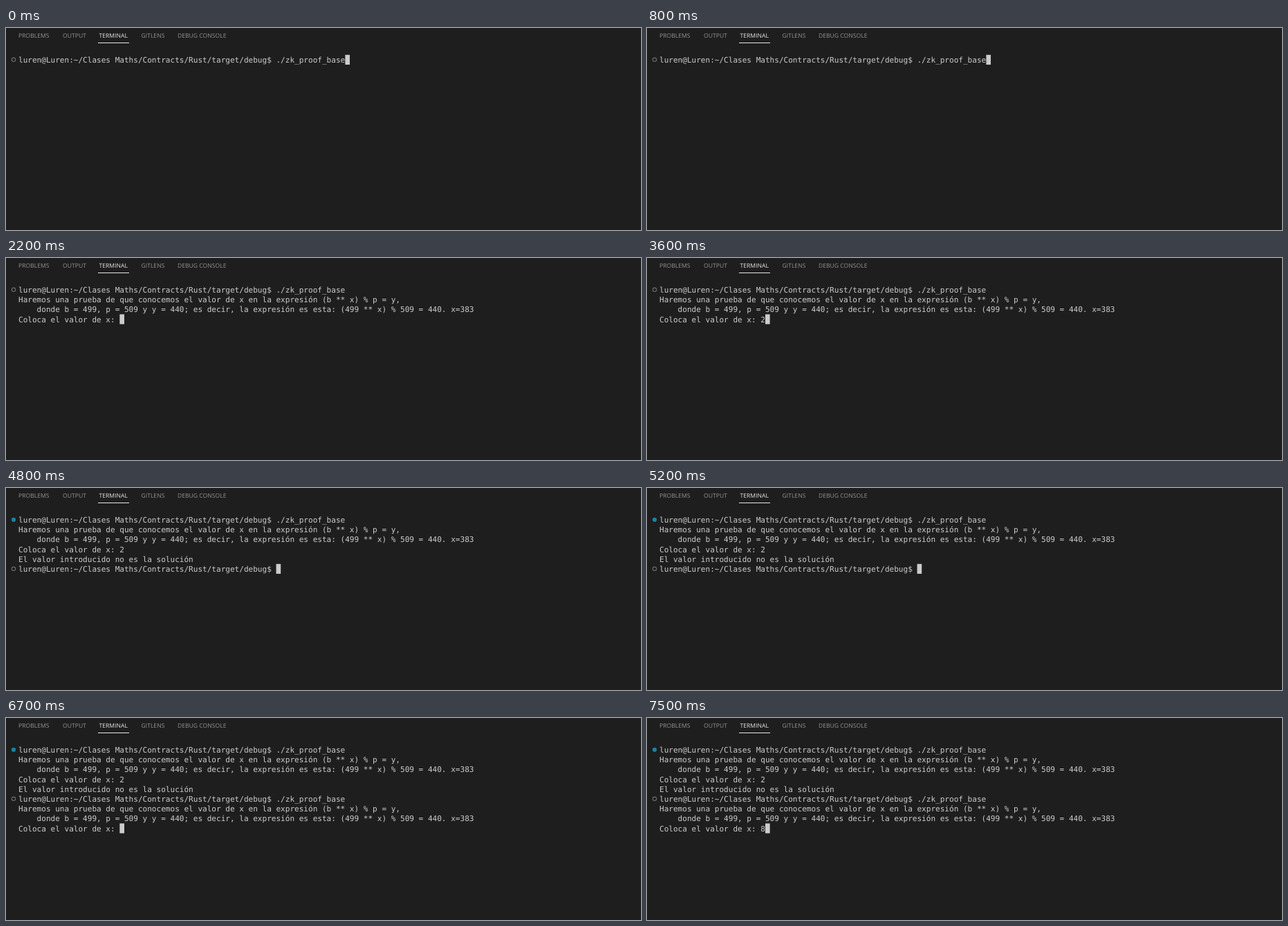
Animation, 918 px wide and 292 px high, one loop 8000 ms. Source, as an HTML page:

```html
<!DOCTYPE html>
<html lang="es">
<head>
<meta charset="utf-8">
<title>Terminal</title>
<style>
  html, body { margin: 0; width: 100%; height: 100%; overflow: hidden; background: #1e1e1e; }
  svg { display: block; width: 918px; height: 292px; }
  text { text-rendering: geometricPrecision; white-space: pre; }
  .tabs { font: 8.6px "Open Sans", "Noto Sans", sans-serif; fill: #939393; }
  .tabs .active { fill: #e7e7e7; }
  .rows { font: 11.05px "DejaVu Sans Mono", monospace; fill: #cccccc; }
  .running { fill: none; stroke: #6e6e6e; stroke-width: 1.1; }
  .done { fill: #1b81a8; }
</style>
</head>
<body>
<svg viewBox="0 0 918 292">
  <rect width="918" height="292" fill="#1e1e1e"/>
  <g class="tabs">
    <text x="18" y="14">PROBLEMS</text>
    <text x="82" y="14">OUTPUT</text>
    <text x="134.5" y="14" class="active">TERMINAL</text>
    <text x="195.5" y="14">GITLENS</text>
    <text x="248" y="14">DEBUG CONSOLE</text>
  </g>
  <rect x="133" y="21" width="45" height="1" fill="#e7e7e7"/>
  <g class="rows" id="rows"></g>
  <rect id="cursor" width="6.65" height="14.2" fill="#cccccc"/>
</svg>
<script>
const LOOP = 8000, LEFT = 18, BASE = 50, PITCH = 14.2, CHAR = 6.6525;
const prompt = "luren@Luren:~/Clases Maths/Contracts/Rust/target/debug$ ";
const command = "./zk_proof_base";
const intro = `
Haremos una prueba de que conocemos el valor de x en la expresión (b ** x) % p = y,
    donde b = 499, p = 509 y y = 440; es decir, la expresión es esta: (499 ** x) % 509 = 440. x=383
Coloca el valor de x: `;

// Text added to the terminal, by start time in ms
const output = [
  [0, prompt + command],
  [1500, intro],
  [3400, "2"],
  [4800, "\nEl valor introducido no es la solución\n" + prompt],
  [5800, command],
  [6500, intro],
  [7400, "8"]
];

const rows = document.getElementById("rows");
const cursor = document.getElementById("cursor");

function add(name, attrs) {
  const el = document.createElementNS("http://www.w3.org/2000/svg", name);
  for (const key in attrs) el.setAttribute(key, attrs[key]);
  return rows.appendChild(el);
}

function render(screen) {
  const lines = screen.split("\n");
  const last = lines.length - 1;
  const lastPrompt = lines.findLastIndex(line => line.startsWith(prompt));
  rows.replaceChildren();
  lines.forEach((line, i) => {
    const y = BASE + i * PITCH;
    add("text", { x: LEFT, y }).textContent = line;
    if (!line.startsWith(prompt)) return;
    const running = i === lastPrompt;
    add("circle", { cx: 11, cy: y - 4.2, r: running ? 2.7 : 3.1, class: running ? "running" : "done" });
  });
  cursor.setAttribute("x", LEFT + lines[last].length * CHAR);
  cursor.setAttribute("y", BASE - 11.2 + last * PITCH);
}

let shown;
function tick() {
  const t = performance.now() % LOOP;
  const screen = output.filter(([start]) => t >= start).map(([, text]) => text).join("");
  if (screen !== shown) render(shown = screen);
  requestAnimationFrame(tick);
}
tick();
</script>
</body>
</html>
```
